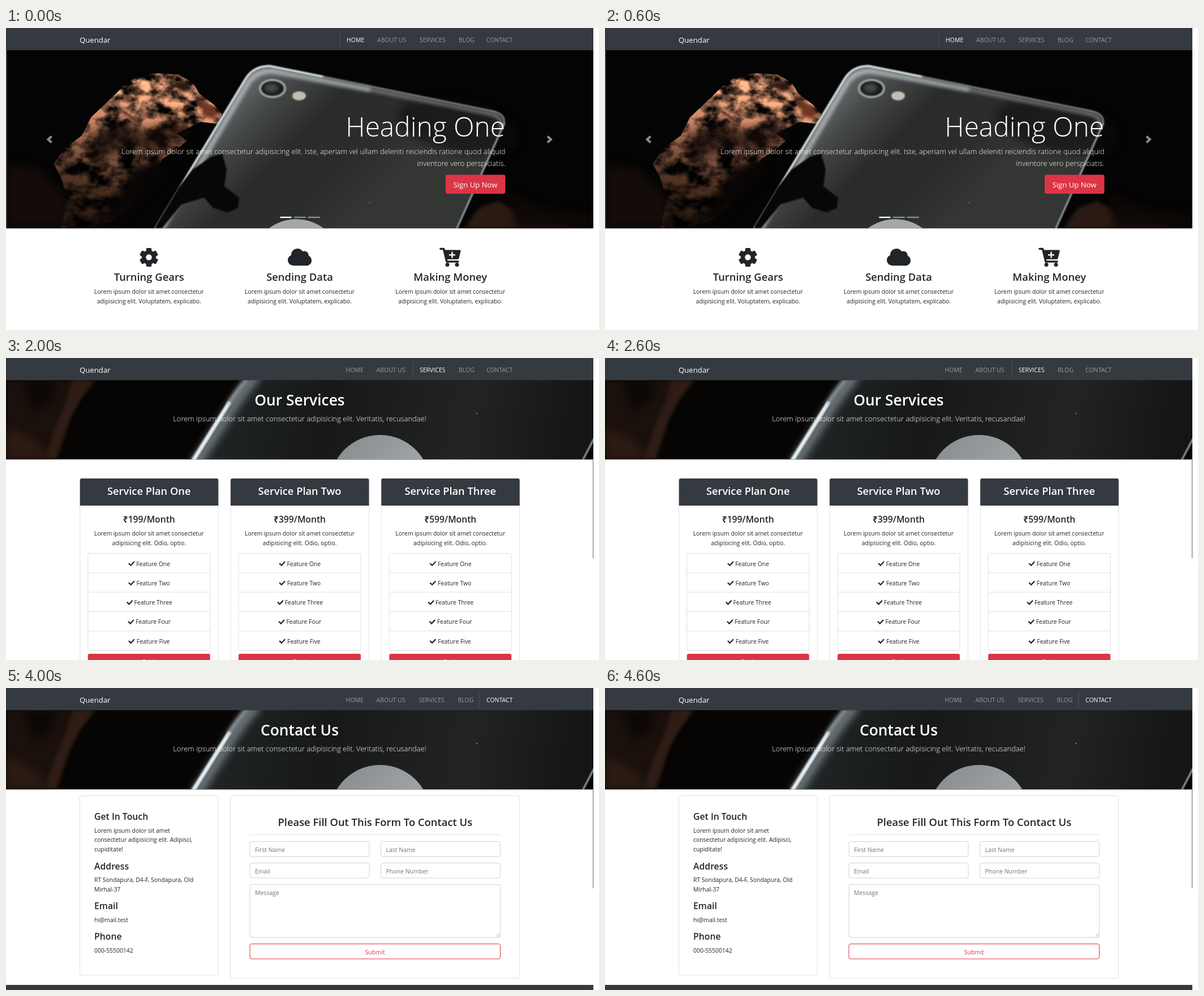
These frames come from a looping animation (1048x534 px, 5 s). An HTML page:

```html
<!DOCTYPE html>
<html lang="en">
<head>
<meta charset="utf-8">
<title>Website tour</title>
<style>
html, body { margin: 0; width: 100%; height: 100%; overflow: hidden; background: #fff; }
svg { display: block; width: 1048px; height: 534px; }
text { font-family: "Open Sans", "Noto Sans", sans-serif; white-space: pre; }
filter { color-interpolation-filters: sRGB; }
</style>
</head>
<body>
<svg id="stage" viewBox="0 0 1048 534" xmlns="http://www.w3.org/2000/svg"></svg>
<script>
const INK = '#212529', DARK = '#343a40', RED = '#dc3545', LINE = '#dfe0e2';
const BODY = 10.4, LEAD = 12.95, STEP = 16.8;
const COLS = [252.75, 519, 785.25];

let seed = 7;
const rnd = (a = 0, b = 1) => {
  seed = (seed * 16807) % 2147483647;
  return a + (b - a) * seed / 2147483647;
};
const pick = list => list[Math.floor(rnd(0, list.length))];
const times = (n, fn) => Array.from({ length: n }, (_, i) => fn(i)).join('');

// Drawing helpers, each returns markup
const text = (x, y, str, size = BODY, fill = INK, anchor = 'start', weight = 400) =>
  `<text x="${x}" y="${y}" font-size="${size}" fill="${fill}" text-anchor="${anchor}" font-weight="${weight}">${str}</text>`;
const head = (x, y, str, size = 18.4, fill = INK, anchor = 'middle') => text(x, y, str, size, fill, anchor, 600);
const lines = (x, y, list, anchor) =>
  list.map((s, i) => text(x, y + i * STEP, s, BODY, INK, anchor)).join('');
const rect = (x, y, w, h, fill, extra = '') =>
  `<rect x="${x}" y="${y}" width="${w}" height="${h}" fill="${fill}" ${extra}/>`;
const box = (x, y, w, h, stroke = LINE, r = 3) => rect(x, y, w, h, '#fff', `rx="${r}" stroke="${stroke}"`);
const poly = (pts, fill, extra = '') => `<polygon points="${pts}" fill="${fill}" ${extra}/>`;
const path = (d, fill, extra = '') => `<path d="${d}" fill="${fill}" ${extra}/>`;
const stroke = (d, color, w, extra = '') =>
  `<path d="${d}" fill="none" stroke="${color}" stroke-width="${w}" stroke-linecap="round" ${extra}/>`;
const oval = (x, y, rx, ry, fill, extra = '') =>
  `<ellipse cx="${x}" cy="${y}" rx="${rx}" ry="${ry}" fill="${fill}" ${extra}/>`;
const turn = (a, x, y) => `transform="rotate(${a} ${x} ${y})"`;
const soft = n => `filter="url(#soft${n})"`;
const group = (attr, inner) => `<g ${attr}>${inner}</g>`;
const clip = (id, inner) => group(`clip-path="url(#${id})"`, inner);

const gradient = (id, coords, stops) => `<linearGradient id="${id}" gradientUnits="userSpaceOnUse" ${coords}>` +
  stops.map(([o, c]) => `<stop offset="${o}" stop-color="${c}"/>`).join('') + '</linearGradient>';
const clipRect = (id, x, y, w, h) => `<clipPath id="${id}">${rect(x, y, w, h, '#000', 'rx="2"')}</clipPath>`;

const defs = '<defs>' +
  [1, 3, 8].map(n => `<filter id="soft${n}" x="-40%" y="-40%" width="180%" height="180%"><feGaussianBlur stdDeviation="${n}"/></filter>`).join('') +
  `<filter id="rough"><feTurbulence type="fractalNoise" baseFrequency=".035 .05" numOctaves="4" seed="3"/>
    <feColorMatrix values="2.8 0 0 0 -.9 2.8 0 0 0 -.9 2.8 0 0 0 -.9 0 0 0 0 1"/>
    <feComposite in2="SourceGraphic" operator="arithmetic" k1="1.9" k2="0" k3=".05" k4="0"/>
    <feComposite in2="SourceGraphic" operator="in"/><feGaussianBlur stdDeviation=".6"/></filter>
  <filter id="warp"><feTurbulence type="fractalNoise" baseFrequency=".03" numOctaves="3" seed="5"/>
    <feDisplacementMap in="SourceGraphic" scale="34" xChannelSelector="R" yChannelSelector="G"/>
    <feGaussianBlur stdDeviation=".6"/></filter>
  <clipPath id="hero">${rect(0, 39, 1038, 315.2)}</clipPath>
  <clipPath id="strip">${rect(0, 39, 1038, 140.2)}</clipPath>
  <clipPath id="disc"><circle cx="718.7" cy="345" r="189"/></clipPath>` +
  [131, 394.5, 658.5].map((x, i) => clipRect('pic' + i, x, 191, 248.5, i < 2 ? 166 : 165)).join('') +
  gradient('glass', 'x1="400" y1="110" x2="620" y2="330"',
    [[0, '#686c6d'], [.2, '#454847'], [.45, '#2a2c2b'], [.75, '#2b2d2c'], [1, '#343634']]) +
  gradient('stone', 'x1="250" y1="80" x2="190" y2="350"',
    [[0, '#96694f'], [.35, '#694534'], [.6, '#402a20'], [.8, '#25170f'], [1, '#150d09']]) +
  gradient('slab', 'x1="380" y1="60" x2="1000" y2="170"',
    [[0, '#202425'], [.3, '#171918'], [.7, '#222423'], [1, '#141514']]) +
  gradient('metal', 'x1="600" y1="140" x2="700" y2="230"', [[0, '#8b8e90'], [1, '#a2a5a7']]) +
  gradient('paper', 'x1="700" y1="156" x2="680" y2="534"', [[0, '#f4f3f4'], [.5, '#e9e8eb'], [1, '#f1f0f1']]) +
  gradient('garden', 'x1="400" y1="300" x2="640" y2="210"',
    [[0, '#f6e3ee'], [.35, '#d3d6cd'], [.7, '#93a892'], [1, '#aab8a8']]) +
  '</defs>';

const NAV = [['HOME', 602], ['ABOUT US', 656], ['SERVICES', 731], ['BLOG', 800], ['CONTACT', 849]];
const navbar = active => rect(0, 0, 1038, 39.2, DARK) +
  text(130, 25.5, 'Quendar', 13.2, '#fff') +
  rect(NAV[active][1] - 12.5, 5.5, 1, 28.5, '#4c5258') +
  NAV.map(([label, x], i) =>
    text(i < active ? x - 1.5 : x, 24.5, label, 10.5, i === active ? '#fff' : '#979a9d')).join('');

const LOREM = 'Lorem ipsum dolor sit amet consectetur';

function heroPhoto() {
  const rock = 'M84 240 104 212 134 190 150 158 188 122 214 96 236 84 268 80 304 82 330 96 342 116 368 136 382 152 376 170 344 166 320 178 302 186 320 200 300 216 276 232 262 262 240 284 220 314 190 340 150 354 98 354 108 300 96 262Z';
  const phone = 'M262 354 422 92Q436 66 466 67L860 146Q886 152 880 172L797 354Z';
  return clip('hero', rect(0, 39, 1038, 316, '#040404') +
    path('M0 240 60 250 100 290 130 354 0 354Z', '#130c09', soft(8)) +
    group('filter="url(#rough)"', path(rock, 'url(#stone)')) +
    path('M150 190 200 166 250 180 300 160 330 180 280 222 210 214 150 240Z', '#150c08', `${soft(8)} opacity=".75"`) +
    path('M225 250 270 225 290 250 240 300 200 345 165 345Z', '#080504', soft(8)) +
    path('M340 120 374 146 370 162 348 156Z', '#6d3422', soft(3)) +
    path('M292 97 322 94 332 110 312 114Z', '#2a1711', soft(3)) +
    path(phone, 'url(#glass)') +
    oval(800, 175, 110, 45, '#0c0d0c', `${turn(12, 800, 175)} ${soft(8)} opacity=".6"`) +
    stroke('M276 354 426 100Q440 76 470 76L640 108', '#c5cdd0', 9, `${soft(3)} opacity=".75"`) +
    stroke('M640 108 858 152Q880 158 874 176', '#9a9fa0', 6, `${soft(3)} opacity=".7"`) +
    stroke('M264 354 422 92Q436 67 466 67L560 86', '#dfe5e8', 3.5, soft(1)) +
    stroke('M560 86 860 147Q884 152 880 170', '#7d8283', 2.5, soft(1)) +
    stroke('M880 170 797 354', '#9ba2a5', 3, soft(1)) +
    oval(471, 107, 22, 15, '#191b1b', `stroke="#9fa3a3" stroke-width="4" ${soft(1)}`) +
    oval(469, 106, 12, 8, '#454948', soft(3)) +
    oval(518, 120, 12, 8, '#c1bfb3', soft(1)) +
    path('M305 282 330 250 362 228 382 222 390 250 386 280 412 300 410 318 392 326 366 318 350 300 310 312 276 354 262 354Z', '#080706', soft(1)) +
    path('M810 354 836 318 870 306 910 328 970 342 1010 354Z', '#2c1b14', soft(3)) +
    path('M890 290 950 320 1038 330 1038 354 900 354Z', '#0e0806', soft(8)) +
    `<circle cx="513" cy="419" r="81" fill="#a5a8a9"/>` +
    oval(643, 309, 1.2, 1.2, '#6a6a68') +
    rect(0, 39, 1.6, 316, '#4a4a4a'));
}

function cart() {
  return stroke('M768 390.5H773.5L779 413H799', INK, 3.6, 'stroke-linejoin="round"') +
    path('M774 392.5H802Q804 392.5 803.5 395L800.5 407Q800 409 798 409H778Z', INK) +
    oval(780, 418.5, 3.5, 3.5, INK) + oval(797, 418.5, 3.5, 3.5, INK) +
    rect(783, 400, 11, 2.4, '#fff') + rect(787.3, 395.7, 2.4, 11, '#fff');
}

function gear(x, y) {
  return times(6, i => rect(x - 4.8, y - 16.5, 9.6, 14, INK, `rx="2" ${turn(i * 60, x, y)}`)) +
    oval(x, y, 12.6, 12.6, INK) + oval(x, y, 5.2, 5.2, '#fff');
}

const cloud = oval(507.5, 410.5, 9.5, 9.5, INK) + oval(515, 401, 11, 11, INK) + oval(527, 402.5, 8, 8, INK) +
  oval(531, 411, 9.2, 9.2, INK) + rect(507, 403, 24, 17.2, INK);

function home() {
  const chevron = (x, s) => stroke(`M${x + 3 * s} 191.5 ${x - 3 * s} 197 ${x + 3 * s} 202.5`, '#8b8b8b', 4, 'style="stroke-linecap:butt"');
  return heroPhoto() + chevron(77.5, 1) + chevron(960, -1) +
    text(882, 192, 'Heading One', 47.8, '#fff', 'end', 300) +
    text(882.5, 223, LOREM + ' adipisicing elit. Iste, aperiam vel ullam deleniti reiciendis ratione quod aliquid', LEAD, '#fff', 'end', 300) +
    text(882.5, 244, 'inventore vero perspiciatis.', LEAD, '#fff', 'end', 300) +
    rect(777, 259.5, 105.5, 33.5, RED, 'rx="3.4"') + text(829.5, 282, 'Sign Up Now', 13.1, '#fff', 'middle') +
    [484.5, 508.5, 533.5].map((x, i) => rect(x, 333.6, i ? 21.5 : 20, 2.4, i ? '#8a8a8a' : '#fff')).join('') +
    gear(252.5, 405.5) + cloud + cart() +
    ['Turning Gears', 'Sending Data', 'Making Money'].map((s, i) => head(COLS[i], 447, s) +
      lines(COLS[i], 470, [LOREM, 'adipisicing elit. Voluptatem, explicabo.'], 'middle')).join('');
}

function banner(title, dim) {
  return clip('strip', rect(0, 39, 1038, 141, '#060504') +
    path('M0 39H150L128 75 110 110 98 140 70 179 0 179Z', '#1a100c', soft(3)) +
    path('M118 39H158L130 75 112 110 90 179 68 179 88 120 106 80Z', '#2f1d15', soft(3)) +
    path('M0 120 50 145 80 179 0 179Z', '#2c1b14', soft(8)) +
    path('M30 39 90 39 80 75 50 95Z', '#0c0806', soft(8)) +
    poly('323,180 392,75 424,39 1038,39 1038,145 1019,180', 'url(#slab)') +
    stroke('M336 186 398 90Q416 62 440 34', '#9aa6ac', 15, `${soft(8)} opacity=".8"`) +
    stroke('M329 184 394 80', '#e4ebef', 7, soft(1)) +
    stroke('M394 80Q406 60 424 39', '#a9b2b6', 5, soft(3)) +
    poly('1019,180 1038,145 1038,180', '#050505') +
    stroke('M1019 181 1039 143', '#b9c9d2', 2.4, soft(1)) +
    `<circle cx="661" cy="225" r="89" fill="${dim ? '#606365' : 'url(#metal)'}"/>` +
    oval(832, 98, 1.3, 1.3, '#777')) +
    head(519, 84, title, 26.4, '#fff') +
    text(519, 111.5, LOREM + ' adipisicing elit. Veritatis, recusandae!', LEAD, '#fff', 'middle', 300) +
    rect(1037, 179.2, 1.2, 175, '#777a7c');
}

// A bundle of parallel cables following one path
const cables = (d, colors, w = 2.4, gap = 2.2) => colors.map((c, i) =>
  stroke(d, c, w, `transform="translate(${i * gap} ${i * gap * .7})"`)).join('');

function wiring() {
  const Y = '#e3bb2c', K = '#2a2724', R = '#d4391f', O = '#cf7a25';
  return clip('disc', rect(529, 155, 380, 380, 'url(#paper)') +
    rect(594, 284, 104, 56, '#42534d') +
    times(42, () => rect(rnd(596, 688), rnd(287, 330), rnd(2, 8), rnd(2, 8), pick(['#273530', '#74877c', '#a9b2a8', '#1e2724']))) +
    cables('M571 222C592 268 590 296 577 306S578 372 606 374', [K, Y, Y], 2.8) +
    cables('M668 184 694 156', [Y, O], 3) +
    cables('M668 198C700 230 694 260 680 282S640 350 652 374 684 392 686 340', [O, Y], 2.8) +
    cables('M690 332C724 338 740 318 742 300S770 266 800 266 832 288 846 296', [K, Y], 2.6) +
    cables('M770 268C800 260 824 270 848 290', [K], 1.6) +
    cables('M664 372C676 344 720 350 742 372S818 396 830 416', [R, O], 1.4, 1) +
    cables('M830 412C850 440 874 428 904 386', [O, K], 2.6) +
    cables('M886 260C856 312 836 356 872 382L910 386', [R, K], 1.7, 3) +
    cables('M894 274C866 330 868 354 876 390', [R, K], 1.8, 3) +
    cables('M668 372C690 400 664 424 676 452S704 492 726 490 756 520 802 518', [K, Y, O], 2.3, 1.6) +
    cables('M764 430C808 468 830 464 852 446S890 412 906 388', [R, K], 2.2, 3) +
    cables('M758 440C792 476 836 494 862 470S888 420 910 394', [Y, Y, K], 2.3, 2.4) +
    cables('M592 398C626 392 650 424 676 436', [R, '#3263a0', '#478a55', Y, K], 2.4, 2) +
    stroke('M640 420C666 436 682 452 688 438S706 376 690 318', '#3b2320', 8) +
    stroke('M640 420C666 436 682 452 688 438S706 376 690 318', '#9b3326', 2, 'stroke-dasharray="3 5"') +
    rect(657, 179, 16, 21, '#26211f', turn(-8, 665, 190)) +
    poly('579,366 601,371 587,431 565,428', '#26282a') +
    times(7, i => rect(574 - i * 1.7, 374 + i * 7.6, 7, 3, '#6b6d6e') + rect(586 - i * 1.7, 376 + i * 7.6, 7, 3, '#5d6061')) +
    rect(840, 290, 23, 21, '#25272a', turn(22, 851, 300)) + rect(846, 294, 9, 4, '#777', turn(22, 851, 300)) +
    rect(738, 409, 25, 32, '#1f2124', turn(-32, 750, 425)) + rect(742, 420, 17, 3, '#4c4f52', turn(-32, 750, 425)) +
    [[577, 302], [668, 236], [762, 381], [745, 306]].map(([x, y]) => rect(x - 3, y, 8, 5, K, turn(20, x, y))).join(''));
}

function about() {
  const copy = ['Lorem ipsum dolor, sit amet consectetur adipisicing elit. Reiciendis',
    'praesentium adipisci voluptatem maxime explicabo hic atque laudantium',
    'modi minus dolorum, excepturi nihil est et debitis accusantium dolor aliquam',
    'illo alias saepe unde rem laborum libero, nemo ad! Enim voluptatem dolor',
    'eveniet, blanditiis reprehenderit quasi nesciunt quibusdam qui deleniti ipsum', 'cumque.'];
  return banner('About Us', true) + head(130, 210, 'What We Do', 18.6, INK, 'start') +
    lines(130, 233, copy) + lines(130, 362, copy) + wiring();
}

function services() {
  const checkX = [-36.3, -36.3, -39.5, -37.3, -36.3];
  return banner('Our Services') + ['One', 'Two', 'Three'].map((n, i) => {
    const c = COLS[i], x = c - 108;
    return box(c - 122, 213.5, 244.5, 340) +
      path(`M${c - 122} 261V216q0-3 3-3h238.500q3 0 3 3V261Z`, DARK) +
      head(c, 241.5, 'Service Plan ' + n, 18.3, '#fff') +
      head(c, 291, `₹${199 + i * 200}/Month`, 15.7) +
      lines(c, 314, [LOREM, 'adipisicing elit. Odio, optio.'], 'middle') +
      box(x, 345.5, 216, 172) +
      ['One', 'Two', 'Three', 'Four', 'Five'].map((f, k) => {
        const y = 367.5 + k * 34.3, cx = c + checkX[k];
        return (k ? rect(x, 345 + k * 34.3, 216, 1, LINE) : '') +
          stroke(`M${cx + 1.2} ${y - 3.8}l3 3 5.400 -5.800`, INK, 2.2, 'style="stroke-linecap:square"') +
          text(c + 7.4, y, 'Feature ' + f, BODY, INK, 'middle');
      }).join('') +
      rect(x, 523, 216, 27, RED, 'rx="3"') + text(c, 540.5, 'Get It', BODY, '#fff', 'middle');
  }).join('');
}

function lava() {
  const cx = 248, cy = 264;
  const pale = ['#d0b3ab', '#c2a49d', '#9a9097', '#dcc6be', '#a48883', '#6a5352'];
  const dull = ['#513c3d', '#7c6361', '#453435', '#a58d89', '#8c8388', '#5d4645'];
  const streak = () => {
    const a = rnd(-Math.PI, Math.PI), r = rnd(8, 165), len = rnd(10, 34);
    const dx = Math.cos(a), dy = Math.sin(a), x = cx + r * dx, y = cy + r * dy * .85;
    return stroke(`M${x} ${y}l${len * dx} ${len * dy}`, pick(dx < -.3 ? dull : pale), rnd(1, 4.5), 'opacity=".85"');
  };
  return clip('pic0', rect(130, 190, 250, 168, '#8a7674') +
    group('filter="url(#warp)"', rect(100, 170, 310, 210, '#927d7b') +
      poly('100,200 180,170 240,255 100,250', '#553f40') + poly('120,268 232,268 205,335 120,330', '#4d3839') +
      times(800, streak)) +
    ['M248 264C252 236 262 214 278 190', 'M248 264C242 300 252 326 236 358', 'M248 264C214 246 190 222 150 214',
      'M248 264C290 262 300 236 380 234', 'M248 264C286 280 310 316 350 340', 'M248 264C216 278 190 322 140 344']
      .map((d, i) => stroke(d, '#858995', i < 2 ? 6 : 3, soft(1))).join('') +
    oval(247, 266, 9, 13, '#898d98', soft(1)));
}

function bee() {
  const petal = (x, y, l, a, c) => oval(x, y, l, l * .34, c, turn(a, x, y));
  const fuzz = (x, y, rx, ry, n, c) => times(n, () => {
    const a = rnd(0, 6.3), px = x + rx * Math.cos(a), py = y + ry * Math.sin(a);
    return stroke(`M${x + rx * .7 * Math.cos(a)} ${y + ry * .7 * Math.sin(a)}L${px} ${py}`, c, 2);
  });
  return clip('pic1', rect(394, 190, 250, 168, 'url(#garden)') +
    oval(420, 330, 60, 50, '#f8d3e8', soft(8)) + oval(425, 215, 40, 30, '#e6e6df', soft(8)) +
    oval(600, 320, 70, 50, '#f0a0cd', soft(8)) +
    group(soft(3), times(34, () => petal(rnd(455, 640), rnd(300, 356), rnd(14, 28), rnd(-80, 80), pick(['#f5b4d8', '#ee8fc4', '#fbd6ea', '#e77db8']))) +
      times(14, () => petal(rnd(575, 640), rnd(205, 300), rnd(15, 25), rnd(-70, 70), pick(['#f3a6d1', '#f9c9e3', '#ea8cc1'])))) +
    oval(490, 258, 34, 42, '#1c1917', `${turn(20, 490, 258)} ${soft(3)}`) +
    oval(515, 230, 40, 20, '#1c1a17', `${turn(-8, 515, 230)} ${soft(3)}`) +
    oval(530, 268, 30, 22, '#1a1817', soft(3)) +
    oval(463, 270, 5, 15, '#cfc37c', `${turn(-12, 463, 270)} ${soft(3)}`) +
    group(soft(1), oval(520, 248, 17, 32, '#dfb81f', turn(35, 520, 248)) +
      fuzz(520, 248, 25, 31, 50, '#c9a51f') +
      oval(549, 258, 21, 26, '#161518', turn(15, 549, 258)) + fuzz(549, 258, 27, 30, 40, '#1d1b1b') +
      oval(556, 254, 5, 9, '#3a4157') +
      ['M484 294 505 316 540 338', 'M505 292 518 318 545 343', 'M548 282 556 304', 'M564 246 582 262']
        .map(d => stroke(d, '#2b201c', 4)).join('') +
      stroke('M500 312 524 328', '#a98242', 2)));
}

function wisteria() {
  const shades = ['#5f5590', '#7a70ab', '#4a4174', '#8f87bd', '#3a3358', '#6a609c'];
  const chain = (x, top, len, w) => times(len * 1.5, i => {
    const t = i / (len * 1.5), s = w * (1 - t * .55);
    return oval(x + rnd(-s, s), top + t * len, rnd(1.5, 4), rnd(1.2, 2.6), pick(shades));
  });
  return clip('pic2', rect(658, 190, 250, 166, '#24241f') + group(soft(1),
    times(90, () => {
      const x = rnd(658, 908), y = rnd(190, 356);
      return oval(x, y, rnd(6, 16), rnd(2, 4), pick(['#34341f', '#17180f', '#2b292c', '#403f24']), turn(rnd(-70, 70), x, y));
    }) +
    times(10, i => {
      const peak = Math.exp(-(((i - 5) / 3.2) ** 2));
      return chain(692 + i * 21.5 + rnd(-4, 4), 192 + rnd(0, 26) * (1 - peak), 85 + 75 * peak, 10 + 3 * peak);
    })) +
    times(14, () => {
      const x = rnd(662, 725), y = rnd(193, 238);
      return oval(x, y, rnd(8, 14), 2, pick(['#5f5d29', '#74702e', '#45461f']), turn(rnd(-65, 30), x, y));
    }));
}

function blog() {
  const copy = ['Lorem ipsum dolor sit amet, consectetur', 'adipisicing elit. Nulla facilis, sequi excepturi,',
    'quisquam, dignissimos molestiae dicta', 'dolore dolores quas vel sunt placeat',
    'tempora expedita suscipit. Magni vel iusto', 'mollitia exercitationem.'];
  const posts = [['One', 'Neil on 05/20', lava], ['Two', 'Paula on 05/22', bee], ['Three', 'Colin on 05/23', wisteria]];
  return banner('Read Our Blog') + posts.map(([n, by, photo], i) => {
    const x = 130.5 + i * 263.8, dy = i === 2 ? -1 : 0;
    return box(x, 190.5, 249.5, 360) + photo() +
      head(x + 14.5, 388 + dy, 'Blog Post ' + n, 15.9, INK, 'start') +
      text(x + 14.5, 413 + dy, 'Written by ' + by, 8.5, '#7d858c') +
      rect(x + 14.5, 427.5 + dy, 221, 1, '#e3e4e5') + lines(x + 14.5, 453 + dy, copy);
  }).join('');
}

function contact() {
  const field = (x, y, w, h, label) => box(x, y, w, h, '#ced4da') + text(x + 9, y + 18.4, label, 10.5, '#6c757d');
  const sub = (y, s) => head(156, y, s, 15.8, INK, 'start');
  return banner('Contact Us') + box(130.5, 190.5, 244.5, 317.5) + box(396.5, 190.5, 511, 322.5) +
    sub(233, 'Get In Touch') +
    lines(156, 255.5, ['Lorem ipsum dolor sit amet', 'consectetur adipisicing elit. Adipisci,', 'cupiditate!']) +
    sub(320.5, 'Address') + lines(156, 343, ['RT Sondapura, D4-F, Sondapura, Old', 'Mirhal-37']) +
    sub(391, 'Email') + lines(156, 413.5, ['hi@mail.test']) +
    sub(445, 'Phone') + lines(156, 467.5, ['000-55500142']) +
    head(652.3, 244, 'Please Fill Out This Form To Contact Us') + rect(431, 259, 443, 1, '#e3e4e5') +
    field(431, 271.5, 211, 26.5, 'First Name') + field(662.5, 271.5, 211, 26.5, 'Last Name') +
    field(431, 309.5, 211, 26.5, 'Email') + field(662.5, 309.5, 211, 26.5, 'Phone Number') +
    field(431, 347.5, 442.5, 93.5, 'Message') +
    stroke('M867 439 872 434M870 439.500 872 437.500', '#888', .8) +
    box(431, 452.5, 442.5, 26.5, RED) + text(652.3, 470.5, 'Submit', 10.6, RED, 'middle') +
    rect(0, 525, 1038, 9, DARK);
}

const stage = document.getElementById('stage');
stage.innerHTML = defs + [home, about, services, blog, contact]
  .map((page, i) => `<g class="page">${page()}${navbar(i)}</g>`).join('');
const pages = stage.querySelectorAll('.page');

function render(ms) {
  const current = Math.floor(ms / 1000) % pages.length;
  pages.forEach((p, i) => { p.style.display = i === current ? '' : 'none'; });
}

function tick() {
  render(performance.now());
  requestAnimationFrame(tick);
}
tick();
</script>
</body>
</html>
```
